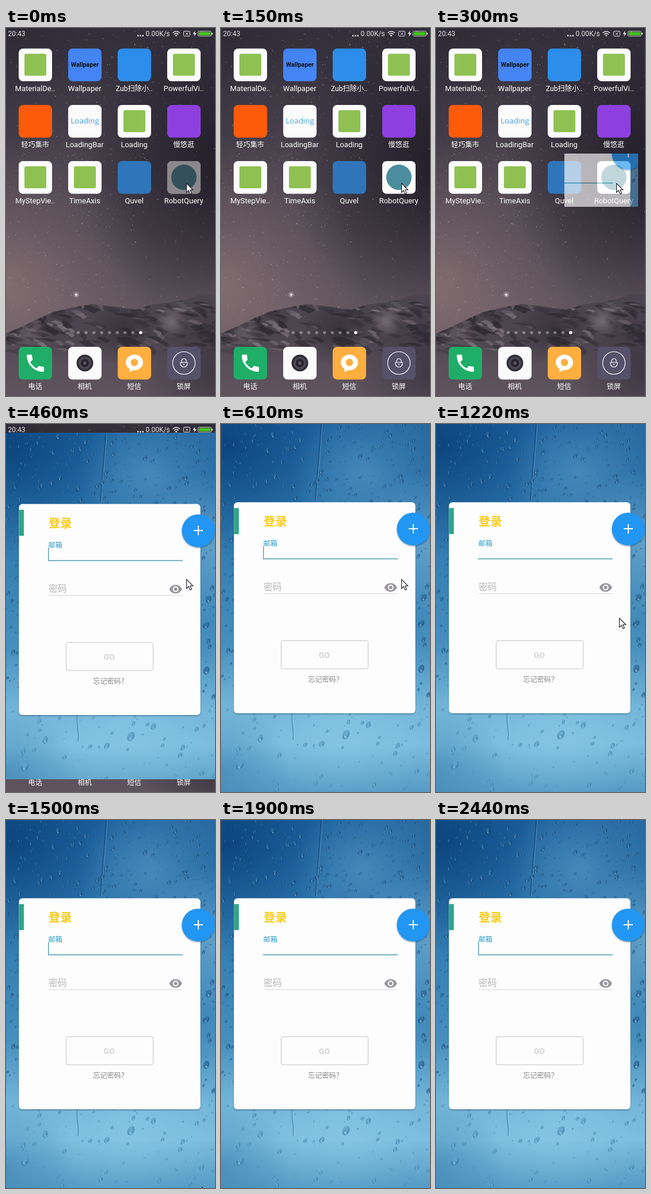
An HTML page with a canvas for the animation above (2550 ms loop, 363 by 636 pixels).

```html
<!DOCTYPE html>
<html lang="zh">
<head>
<meta charset="utf-8">
<title>Login card</title>
<style>
  html, body { margin: 0; width: 100%; height: 100%; overflow: hidden; background: #37323d; }
  #stage { position: absolute; left: 0; top: 0; width: 363px; height: 636px; overflow: hidden; }
  #stage > *, #app * { position: absolute; left: 0; top: 0; }
  #app, #page { width: 363px; height: 636px; }
  text { font-family: Roboto, "Noto Sans CJK SC", "Noto Sans CJK", sans-serif; }
  .label { font-size: 13px; fill: #fff; text-anchor: middle; }
  .cjk { font-size: 12.2px; }
  .forgot { font: 12.1px "Noto Sans CJK TC", "Noto Sans CJK", sans-serif; fill: #858585; }
</style>
</head>
<body>
<div id="stage">
  <canvas id="night" width="363" height="636"></canvas>
  <svg id="home" width="363" height="636"></svg>
  <div id="app"><div id="page">
    <canvas id="rain" width="363" height="636"></canvas>
    <svg id="login" width="363" height="636">
      <defs>
        <filter id="soft" x="-20%" y="-20%" width="140%" height="140%">
          <feDropShadow dx="0" dy="1.3" stdDeviation="1.2" flood-color="#123" flood-opacity=".45"/>
        </filter>
      </defs>
      <rect x="22.5" y="135.3" width="315" height="364.7" rx="6" fill="#fdfdfd" filter="url(#soft)"/>
      <rect x="22.5" y="145.3" width="8.5" height="45" fill="#2fa588"/>
      <text x="74" y="175.8" font-size="20.3" font-weight="700" fill="#fbcb18">登录</text>
      <text x="73.5" y="211" font-size="12.2" fill="#2b9bcb">邮箱</text>
      <path d="M73 233H307" stroke="#4a9fae" stroke-width="1.4"/>
      <path id="caret" d="M73.8 211V233" stroke="#4a9fae" stroke-width="1.4"/>
      <text x="74" y="286.8" font-size="15.8" font-weight="300" fill="#b5b5b5">密码</text>
      <path d="M74 293.2H307" stroke="#d4d4d4"/>
      <path transform="translate(282.7 270.5)" fill="#99969d" fill-rule="evenodd" d="M12 4.5C7 4.5 2.7 7.6 1 12c1.7 4.4 6 7.5 11 7.5s9.3-3.1 11-7.5C21.3 7.6 17 4.5 12 4.5zM12 17a5 5 0 1 1 0-10 5 5 0 0 1 0 10zm0-8a3 3 0 1 0 0 6 3 3 0 0 0 0-6z"/>
      <rect x="104.5" y="374.5" width="151" height="48.5" rx="2.5" fill="none" stroke="#c4c4c4"/>
      <text x="170" y="404" font-size="13.6" letter-spacing=".3" fill="#bdbdbd">GO</text>
      <text class="forgot" x="151.3" y="446.3">忘记密码？</text>
      <circle cx="333.8" cy="181.6" r="28.4" fill="#2196f3" filter="url(#soft)"/>
      <path d="M326 181H342M334 173V189" stroke="#fff" stroke-width="2"/>
    </svg>
  </div></div>
  <svg id="mouse" width="16" height="24">
    <path d="M.6.6V16.2L4.2 12.8 6.8 18.9 9.4 17.8 6.9 11.8H11.7Z" fill="#fff" stroke="#1a1722" stroke-width="1.1"/>
  </svg>
</div>
<script>
const W = 363, H = 636, LOOP = 2550;
const $ = id => document.getElementById(id);

function random(seed) {
  return () => (seed = (seed * 1664525 + 1013904223) % 4294967296) / 4294967296;
}

function fillGradient(ctx, gradient, ...colors) {
  colors.forEach(([at, color]) => gradient.addColorStop(at, color));
  ctx.fillStyle = gradient;
  ctx.fillRect(0, 0, W, H);
}

function glow(ctx, x, y, r, rgb, alpha) {
  fillGradient(ctx, ctx.createRadialGradient(x, y, 0, x, y, r),
    [0, `rgba(${rgb},${alpha})`], [1, `rgba(${rgb},0)`]);
}

function paintNight() {
  const ctx = $('night').getContext('2d'), rnd = random(17);
  fillGradient(ctx, ctx.createLinearGradient(0, 0, 0, H),
    [0, '#322e3a'], [.3, '#3f3945'], [.55, '#4e4651'], [.75, '#5e535d'], [1, '#5d525c']);
  glow(ctx, 0, 440, 250, '160,130,130', .55);
  glow(ctx, 120, 220, 170, '104,92,102', .25);
  glow(ctx, 390, 240, 270, '26,23,34', .85);
  glow(ctx, 0, 0, 120, '40,37,46', .4);

  for (let i = 0; i < 1300; i++) {
    const y = Math.floor(rnd() * 500), band = 210 - y * .3;
    const x = Math.floor(i % 3 ? band + (rnd() + rnd() + rnd() - 1.5) * 170 : rnd() * W);
    const size = rnd() < .05 ? 1.6 : 1;
    ctx.fillStyle = `rgba(226,212,216,${.08 + rnd() ** 3 * .75})`;
    ctx.fillRect(x, y, size, size);
  }
  glow(ctx, 122, 461, 6, '255,248,245', .6);
  ctx.fillStyle = '#fff';
  ctx.beginPath(); ctx.arc(122, 461, 1.5, 0, 7); ctx.fill();

  const ridge = [[0, 528], [28, 516], [55, 503], [82, 491], [112, 484], [150, 477], [185, 481],
    [225, 487], [255, 478], [285, 474], [314, 469], [340, 459], [363, 462], [363, 636], [0, 636]];
  ctx.save();
  ctx.beginPath();
  ridge.forEach(p => ctx.lineTo(...p));
  ctx.closePath();
  ctx.clip();
  fillGradient(ctx, ctx.createLinearGradient(0, 460, 0, H),
    [0, '#4b444e'], [.4, '#4c444e'], [.7, '#5a4f5a'], [1, '#5f535d']);

  // Rock faces slope down to the right; snow lies in thinner flakes than the shadows.
  for (let i = 0; i < 170; i++) {
    const snow = i % 3 == 0, x = rnd() * (W + 30) - 30, y = 466 + rnd() * 92;
    const w = snow ? 8 + rnd() * 22 : 14 + rnd() * 30, h = snow ? 2 + rnd() * 6 : 3 + rnd() * 9;
    ctx.fillStyle = snow ? `rgba(142,128,135,${.2 + rnd() * .45})` : `rgba(40,36,44,${.2 + rnd() * .45})`;
    ctx.beginPath();
    ctx.moveTo(x, y);
    ctx.quadraticCurveTo(x + w * .4, y - h, x + w, y + h * .6);
    ctx.lineTo(x + w * .75, y + h * 1.3);
    ctx.quadraticCurveTo(x + w * .4, y + h * .4, x, y);
    ctx.fill();
  }
  glow(ctx, 205, 522, 62, '38,34,42', .5);
  glow(ctx, 288, 508, 28, '165,150,157', .5);
  glow(ctx, 40, 530, 34, '140,124,130', .35);
  glow(ctx, 363, 595, 130, '48,43,54', .65);
  ctx.restore();
}

function paintRain() {
  const ctx = $('rain').getContext('2d'), rnd = random(43);
  fillGradient(ctx, ctx.createLinearGradient(0, 0, 0, H),
    [0, '#1d629f'], [.3, '#2f7ab1'], [.6, '#468fbd'], [.77, '#74b6d9'], [.87, '#7dbddd'], [1, '#559bc4']);
  glow(ctx, 10, 40, 190, '2,52,108', .65);
  glow(ctx, 250, 85, 125, '92,154,195', .6);
  glow(ctx, 340, 10, 110, '54,117,165', .5);
  glow(ctx, 363, 210, 130, '128,183,215', .6);
  glow(ctx, 215, 530, 140, '150,212,237', .35);
  glow(ctx, 0, 600, 120, '50,122,172', .5);

  function streak(color, width, x, y, dx, length) {
    ctx.strokeStyle = color;
    ctx.lineWidth = width;
    ctx.beginPath();
    ctx.moveTo(x, y);
    ctx.bezierCurveTo(x - 3, y + length * .4, x + dx + 3, y + length * .6, x + dx, y + length);
    ctx.stroke();
  }
  streak('rgba(8,48,90,.4)', 2, 174, 0, -10, 132);
  streak('rgba(160,205,230,.3)', 1.2, 176, 0, -10, 132);
  streak('rgba(35,95,140,.4)', 2, 124, 500, 1, 46);
  streak('rgba(180,225,245,.35)', 1, 126, 500, 1, 46);

  function drop(x, y, r) {
    const low = y > 480;
    ctx.save();
    ctx.translate(x, y);
    ctx.rotate(.1 + rnd() * .6);
    const shape = (dx, dy, rx, ry, color) => {
      ctx.fillStyle = color;
      ctx.beginPath();
      ctx.ellipse(dx, dy, rx, ry, 0, 0, 7);
      ctx.fill();
    };
    shape(0, 0, r * .9, r * 1.3, low ? 'rgba(35,105,155,.5)' : 'rgba(8,52,98,.5)');
    shape(-r * .25, -r * .3, r * .65, r * .9, low ? 'rgba(115,182,215,.6)' : 'rgba(64,132,180,.6)');
    shape(r * .2, r * .65, r * .38, r * .35, 'rgba(185,224,244,.5)');
    ctx.restore();
  }
  for (let i = 0; i < 230; i++) drop(rnd() * W, rnd() * 137, .9 + rnd() ** 3 * 2.8);
  for (let i = 0; i < 62; i++) {
    drop(i % 2 ? 339 + rnd() * 24 : rnd() * 22, 137 + rnd() * 363, 1 + rnd() ** 2 * 3);
  }
  for (let i = 0; i < 75; i++) drop(rnd() * W, 500 + rnd() * 136, 1 + rnd() ** 2 * 3);
  [[90, 19, 4], [217, 537, 6.5], [33, 590, 6], [348, 345, 5], [352, 300, 5], [348, 423, 5.5],
    [167, 98, 3.5], [68, 543, 5], [30, 562, 4], [175, 553, 4.5], [256, 520, 4.5], [340, 600, 4]]
    .forEach(d => drop(...d));
}

const android = (x, y) => `<rect x="${x + 10}" y="${y + 9}" width="38" height="38" rx="3" fill="#8fc152"/>`;
const word = (text, style) => (x, y) =>
  `<text x="${x + 29}" y="${y + 31.5}" text-anchor="middle" style="${style}">${text}</text>`;
const blank = () => '';
const rings = (...list) => (x, y) => list.map(([r, color]) =>
  `<circle cx="${x + 29}" cy="${y + 28}" r="${r}" fill="${color}"/>`).join('');
const phone = (x, y) => `<path transform="translate(${x + 9.2} ${y + 8.5}) scale(1.65)" fill="#fff" d="M6.6 10.8c1.4 2.8 3.8 5.1 6.6 6.6l2.2-2.2c.3-.3.7-.4 1-.2 1.1.4 2.3.6 3.6.6.6 0 1 .4 1 1V20c0 .6-.4 1-1 1C10.6 21 3 13.4 3 4c0-.6.4-1 1-1h3.5c.6 0 1 .4 1 1 0 1.3.2 2.5.6 3.6.1.3 0 .7-.2 1z"/>`;
const bubble = (x, y) => `<g transform="translate(${x + 29} ${y + 27})"><path d="M-9 8L-8.5 16.5 1 12Z" fill="#fff"/>
  <ellipse rx="15" ry="13.5" fill="#fff"/><circle r="6.3" fill="#ffae40"/></g>`;
const lock = (x, y) => `<g transform="translate(${x + 29} ${y + 28})" fill="none" stroke="#fff" stroke-width="1.2">
  <circle r="19.5"/><path d="M-4 -1V-3.5A4 4 0 0 1 4 -3.5V-1M-6 -1H6V1A6 6 0 0 1 -6 1ZM0 1V4"/></g>`;

const apps = [
  ['MaterialDe..', '#fbfbfb', android],
  ['Wallpaper', '#4584f3', word('Wallpaper', 'font:700 10.8px Roboto,sans-serif;fill:#111')],
  ['Zub扫除小..', '#2c8eea', blank],
  ['PowerfulVi..', '#fbfbfb', android],
  ['轻巧集市', '#fd5a0a', blank],
  ['LoadingBar', '#fbfbfb', word('Loading', 'font:13.4px Open Sans,sans-serif;fill:#459fdc')],
  ['Loading', '#fbfbfb', android],
  ['慢悠逛', '#8d3fe0', blank],
  ['MyStepVie..', '#fbfbfb', android],
  ['TimeAxis', '#fbfbfb', android],
  ['Quvel', '#2f75ba', blank],
  ['RobotQuery', '#fbfbfb', rings([22, '#4b8d9c'])],
  ['电话', '#1fae68', phone],
  ['相机', '#fbfbfb', rings([14.5, '#2f2c35'], [11, '#4b4752'], [7, '#25222b'], [3, '#5a5265'])],
  ['短信', '#ffae40', bubble],
  ['锁屏', '#55516a', lock],
];

function buildHome() {
  const rows = [35.5, 133, 230, 551];
  const tile = (x, y, extra) => `<rect x="${x}" y="${y}" width="58" height="56.5" rx="7.5" ${extra}/>`;
  const icons = apps.map(([name, color, glyph], i) => {
    const x = 22 + i % 4 * 86, y = rows[i >> 2];
    const cjk = /[^\x00-\x7f]/.test(name) ? ' cjk' : '';
    return tile(x, y, `fill="${color}"`) + glyph(x, y) +
      `<text class="label${cjk}" x="${x + 28.7}" y="${y + 73.3}">${name}</text>`;
  });
  const dots = Array.from({ length: 9 }, (_, i) =>
    `<circle cx="${125.5 + i * 13.55}" cy="526.5" r="2.8" fill="#fff" opacity="${i == 8 ? 1 : .33}"/>`);
  const status = `<g fill="#e4e1e6" font-size="12">
    <text x="3.5" y="14.2">20:43</text><text x="242.5" y="14.2">0.00K/s</text>
    <path d="M228 12h2.4v2.4h-2.4zM232.3 12h2.4v2.4h-2.4zM236.6 12h2.4v2.4h-2.4z"/>
    <g fill="none" stroke="#e4e1e6" stroke-width="1.4"><path d="M289.5 8.5Q295.7 3 302 8.5M291.8 11Q295.7 7.6 299.8 11"/>
    <rect x="308.5" y="5.5" width="11" height="8.5" rx="1.5" stroke-width="1"/><path d="M312 7.5l4.5 4.5m0-4.5l-4.5 4.5" stroke-width="1"/></g>
    <circle cx="295.7" cy="13" r="1.6"/><path d="M328.5 4.5L324.5 10.5H327.3L326.3 15 331 8.8H328Z"/>
    <rect x="333.5" y="5.5" width="23" height="8.5" rx="2" fill="none" stroke="#cfd6cc"/>
    <rect x="335" y="7" width="20" height="5.5" rx="1" fill="#45c51c"/><path d="M357.5 8h1.5v3.5h-1.5z"/></g>`;
  $('home').innerHTML = icons.join('') + dots.join('') + status +
    tile(280, 230, 'id="press" fill="#1c141a" fill-opacity=".5"');
}

// Each row is [time in ms, style]; a style holds until the next row.
function play(id, rows) {
  const frames = rows.map(([at, style]) => ({ ...style, offset: at / LOOP, easing: 'steps(1, end)' }));
  frames.push({ ...rows[rows.length - 1][1], offset: 1 });
  $(id).animate(frames, { duration: LOOP, iterations: Infinity });
}

paintNight();
paintRain();
buildHome();

const show = opacity => ({ opacity });
const move = (x, y) => ({ transform: `translate(${x}px, ${y}px)` });
play('press', [[0, show(1)], [150, show(0)]]);
play('app', [
  [0, { opacity: 0, clipPath: 'inset(217px 12px 327px 223px)' }],
  [300, { opacity: .66, clipPath: 'inset(217px 12px 327px 223px)' }],
  [460, { opacity: 1, clipPath: 'inset(15px 0px 22px 0px)' }],
  [610, { opacity: 1, clipPath: 'inset(0px 0px 0px 0px)' }],
]);
play('page', [[0, move(0, 35)], [460, move(0, 3)], [610, move(0, 0)]]);
play('caret', [[0, show(0)], [460, show(1)], [920, show(0)], [1350, show(1)], [1900, show(0)], [2320, show(1)]]);
play('mouse', [[0, move(313, 268)], [1220, move(318, 335)], [1350, move(333, 510)],
  [1500, move(340, 634)], [1630, move(340, 660)]]);
</script>
</body>
</html>
```
